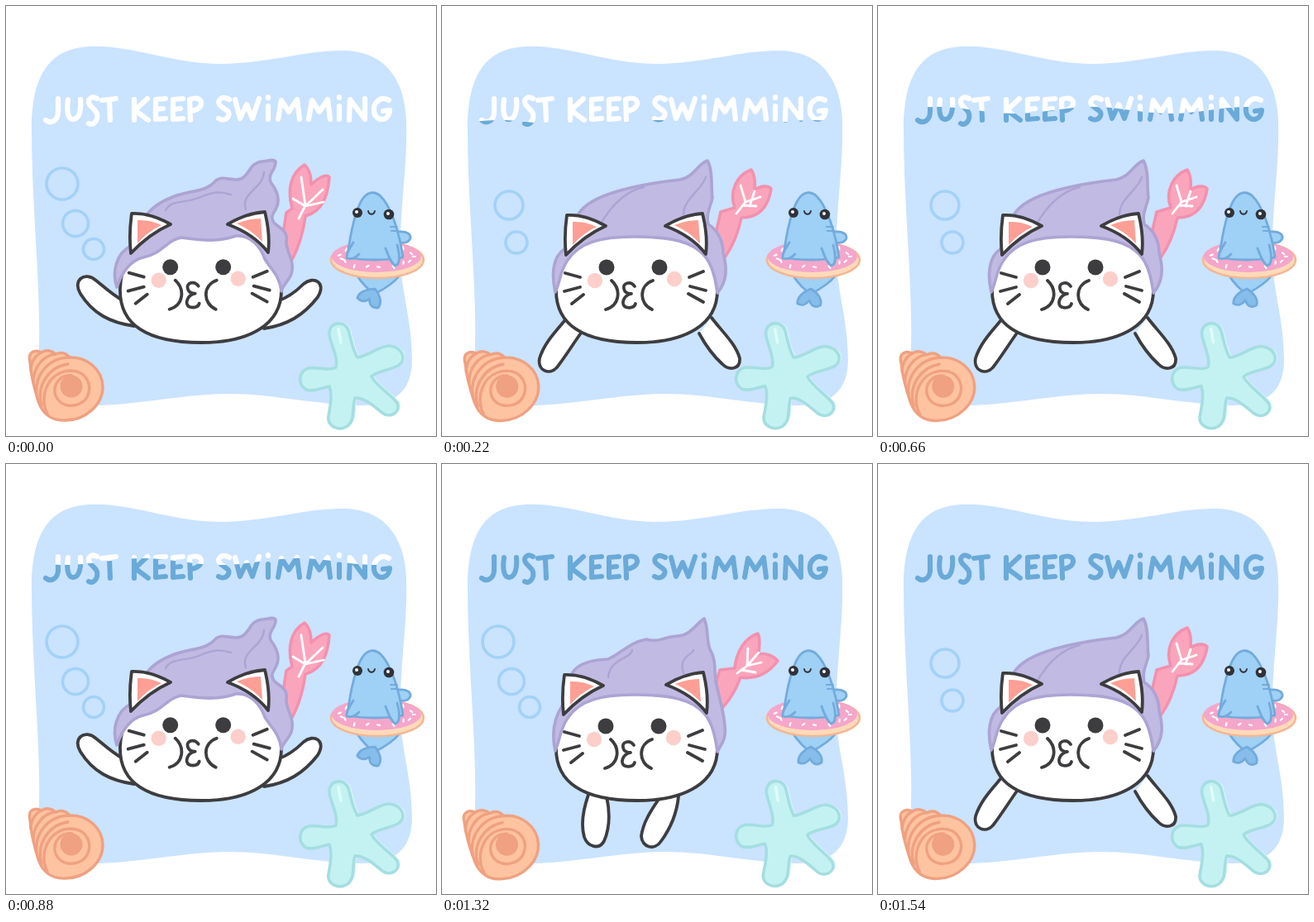
Write an HTML page that moves like this. It is 520 px wide and 520 px high and loops after 1760 ms.

```html
<!DOCTYPE html>
<html lang="en">
<head>
<meta charset="utf-8">
<title>Just keep swimming</title>
<style>
html, body { margin: 0; width: 100%; height: 100%; overflow: hidden; background: #fff; }
svg { display: block; width: 100%; height: 100%; }
path, circle, ellipse { stroke-linecap: round; stroke-linejoin: round; }
.line { fill: none; }
.ink { stroke: #3d3d40; stroke-width: 3.8; }
.white { fill: #fff; }
.bubble { fill: none; stroke: #a4d1f7; stroke-width: 3.6; }
.tail { fill: #fba5bd; stroke: #f391ae; stroke-width: 3.6; }
.vein { fill: none; stroke: #fff; stroke-width: 2.8; }
.hair { fill: #c1bae3; stroke: #aca4d3; stroke-width: 3.6; }
.strand { fill: none; stroke: #aca4d3; stroke-width: 2.4; }
.shark { fill: #9fd0f5; stroke: #72abdc; stroke-width: 2.8; }
.fin { fill: #86bdea; }
.shell { fill: none; stroke: #efa181; stroke-width: 3.4; }
.letters { fill: none; stroke-width: 6.2; }
</style>
</head>
<body>
<svg viewBox="0 0 520 520">
  <defs>
    <path id="words" d="M63 112L63 128C63 139 54 143 48 138
      M75 113C73 128 75 138 82 137C89 136 91 124 90 113
      M110 112C103 108 98 113 101 119C105 125 112 127 110 136C108 143 103 144 100 142
      M116 114L133 112M125 114L126 138
      M155 113L155 138M171 112L156 126L172 138
      M193 112L181 113L181 137L193 136M181 125L190 124
      M214 112L202 113L202 137L214 136M202 125L211 124
      M223 138L222 113C240 106 241 126 223 127
      M270 113C262 108 255 113 258 119C262 125 272 126 269 133C266 139 260 138 257 136
      M277 113L283 136L291 119L298 136L306 112
      M317 121L317 137M317 110L317 111
      M329 137L333 114L342 128L352 113L355 137
      M366 137L370 114L379 128L389 113L392 137
      M403 121L403 137M403 110L403 111
      M415 138L416 113L434 137L434 112
      M463 114C453 108 444 117 445 127C446 140 463 141 464 126L456 127"/>
    <clipPath id="water"><path id="wave"/></clipPath>
    <path id="star" d="M391 398C389 382 409 379 414 392C417 402 419 416 425 425C440 423 452 410 464 411C480 413 485 428 474 435C462 441 447 442 442 448C448 460 466 470 473 480C478 492 464 499 455 492C443 482 432 473 422 474C418 486 423 500 413 508C402 515 388 508 390 496C392 484 395 470 391 460C380 462 372 467 363 464C352 457 354 441 366 438C378 436 390 442 399 437C402 425 393 410 391 398Z"/>
  </defs>

  <path fill="#cae3ff" d="M100 49C150 46 200 70 260 70C320 69 360 54 405 54C455 53 482 85 484 138C486 195 475 250 477 310C479 350 491 380 491 430C490 472 462 483 430 483C370 482 320 468 265 469C210 470 150 484 100 483C60 480 38 470 40 410C42 340 31 240 31 150C31 90 48 52 100 49Z"/>

  <g role="img" aria-label="Just keep swimming">
    <use href="#words" class="letters" stroke="#fff"/>
    <g clip-path="url(#water)"><use href="#words" class="letters" stroke="#6aaad9"/></g>
  </g>

  <g id="bubbles"></g>
  <g id="cat"></g>

  <g>
    <path class="shark" d="M423 324C429 333 437 343 446 348C458 342 468 336 476 326Z"/>
    <path id="fluke" class="shark fin" d="M446 342C438 346 430 352 431 361C437 364 442 361 445 356C448 363 453 365 459 361C461 353 454 346 446 342Z"/>
    <ellipse cx="449" cy="307" rx="56" ry="22" fill="#fddab9" stroke="#f4b694" stroke-width="2.5"/>
    <ellipse cx="448" cy="303" rx="54" ry="19" fill="#f5a6cb"/>
    <path id="sprinkles" class="vein" style="stroke-width:2.2"/>
    <path class="shark" d="M476 273C484 272 490 276 489 281C487 286 481 287 477 286"/>
    <path class="shark" d="M413 304C416 275 424 238 435 229C441 224 448 225 453 230C466 243 476 275 480 304C460 308 432 308 413 304Z"/>
    <path class="shark" d="M420 286C416 293 411 299 412 305C418 307 424 303 427 300"/>
    <path class="shark" d="M459 293C462 301 465 311 471 314C477 312 476 300 473 289"/>
    <path class="shark line" style="stroke-width:2" d="M465 267L473 267M466 272L474 272"/>
    <g fill="#303238"><circle cx="425" cy="250" r="6"/><circle cx="463" cy="252" r="6.3"/></g>
    <circle cx="424" cy="249" r="2" fill="#fff"/><circle cx="462" cy="251" r="2" fill="#fff"/>
    <path class="line" stroke="#303238" stroke-width="1.8" d="M438 248C439 253 445 253 446 248"/>
  </g>

  <g id="starfish">
    <use href="#star" fill="#d3f7f5" transform="translate(3 -1)"/>
    <use href="#star" fill="#c4f2f2"/>
    <use href="#star" fill="none" stroke="#a5dee0" stroke-width="3.6"/>
    <path class="line" stroke="#e0fbfa" stroke-width="3.5" d="M402 391L405 407"/>
  </g>

  <g id="shell">
    <path class="shell" style="fill:#fec3a0" d="M29 430C26 418 35 415 43 419C48 415 56 417 60 421C67 418 73 420 77 425C98 424 117 440 117 461C117 482 96 501 72 501C55 502 44 493 39 478C34 462 30 447 29 430Z"/>
    <path class="shell" d="M30 441C30 430 36 422 43 419M33 455C33 436 46 422 60 421M37 470C34 446 52 425 77 425M43 483C36 458 53 436 75 433"/>
    <path class="shell" d="M50 493C39 472 51 441 79 441C98 442 105 459 98 473C90 487 66 487 60 471C55 456 68 445 80 447"/>
    <circle cx="79" cy="460" r="13.5" fill="#efa181"/>
  </g>
</svg>
<script>
const $ = id => document.getElementById(id);
const path = (cls, d) => `<path class="${cls}" d="${d}"/>`;
const bubble = ([x, y, r]) => `<circle class="bubble" cx="${x}" cy="${y}" r="${r}"/>`;

const threeBubbles = [[68, 215, 19], [84, 263, 15.5], [106, 294, 12.5]];
const twoBubbles = [[81, 241, 17], [90, 286, 13]];
const hairline = "C330 325 325 306 311 296C295 282 265 279 232 279C190 279 166 287 153 306C142 320 143 335 137 346Z";

const up = {
  bubbles: threeBubbles, face: [.7, .7], ears: [1, -2, -2, -2], shell: 0, star: 0, fluke: 25,
  arms: "M155 387C126 383 105 372 90 348C80 332 95 320 109 332C120 341 130 350 141 356M312 390C340 386 360 374 377 352C388 334 372 326 360 336C350 346 340 353 328 357",
  hair: "M134 340C128 322 133 299 151 290L165 268C166 252 180 240 199 232C220 222 240 227 254 211C262 204 274 213 284 209C296 204 293 190 310 188C318 187 323 185 326 188C327 198 316 202 320 213C327 222 333 234 326 246C322 253 320 255 324 262C332 270 341 271 339 285C338 296 350 308 345 324C342 333 335 336 333 345C331 326 320 318 313 306C308 292 296 276 278 278C256 286 235 283 212 280C194 283 190 299 166 304C149 308 140 323 134 340Z",
  strands: "M193 247C200 234 215 239 233 232C253 223 262 225 272 228M290 246C283 226 311 221 312 201",
  tail: "M339 250L346 245C340 222 344 202 361 192C369 200 369 210 369 216C376 209 387 202 391 207C389 230 383 248 362 254C359 276 353 296 342 313L333 290Z",
  veins: "M354 257L362 241L357 207M347 233L362 242L383 222M362 242L384 237"
};
const mid = {
  bubbles: twoBubbles, face: [1, 1], ears: [0, 0, 0, 0], shell: -1, star: .8, fluke: 4,
  arms: "M152 376C140 391 124 406 118 426C115 441 130 447 139 437C149 424 159 408 169 394M326 377C338 393 355 408 360 426C361 440 347 441 339 433C328 423 318 409 311 396",
  hair: "M137 346C132 325 134 303 148 294L160 264C163 246 179 235 203 227C231 217 261 213 288 210C306 206 309 191 321 187C328 199 325 220 327 232C325 242 319 251 322 264C334 271 340 285 340 299C345 317 345 333 333 347" + hairline,
  strands: "M194 260C205 242 222 224 244 219M292 252C292 233 314 223 319 207",
  tail: "M337 249L354 244C347 224 356 205 374 198C380 207 378 216 378 222C386 217 395 217 398 221C395 240 386 256 362 256C358 275 352 290 342 304L330 280Z",
  veins: "M356 251L367 237L361 217M372 242L378 224M367 237L385 231M364 241L380 242"
};
const down = {
  bubbles: threeBubbles, face: [0, 2], ears: [-3, 2, 1, 1], shell: -2, star: 1.6, fluke: 0,
  arms: "M177 400C170 420 168 437 172 451C176 463 190 467 196 456C203 440 203 420 199 402M263 404C252 420 243 434 241 450C242 464 257 468 265 456C276 441 284 422 286 402",
  hair: "M137 347C132 325 136 307 145 293L154 266C155 243 176 237 201 236C217 229 226 216 247 212C262 217 273 207 286 208C302 206 306 194 317 187C323 200 319 211 324 224C333 239 328 254 332 267C336 286 341 300 342 317C344 333 338 338 333 348" + hairline,
  strands: "M201 258C203 235 230 235 230 225M292 253C285 233 304 230 304 225",
  tail: "M336 249L354 247C356 226 367 210 382 205C386 213 383 222 383 230C391 228 401 232 406 238C396 252 380 261 361 258C356 272 349 285 337 297L328 275Z",
  veins: "M357 253L369 244L370 223M369 244L383 228M369 244L386 240M362 249L379 252"
};
const poses = [up, mid, down, mid];
const levels = [160, 142, 134, 126, 118, 110, 95, 95];

const ear = (outer, inner, x, y) => `<g transform="translate(${x} ${y})">` +
  path("ink white", outer) + `<path fill="#fd9f94" d="${inner}"/></g>`;

const face = `
  <g fill="#3d3d40"><circle cx="198" cy="315" r="9.5"/><circle cx="262" cy="315" r="9.5"/></g>
  <g fill="#fccfca"><circle cx="184" cy="331" r="9.2"/><circle cx="280" cy="329" r="9.2"/></g>` +
  path("ink line", "M204 331C216 342 214 361 197 366M254 331C237 337 237 359 253 366") +
  path("ink line", "M232 338C227 331 217 334 219 341C220 346 224 347 228 347C218 349 215 360 221 363C227 365 232 363 233 359") +
  path("ink line", "M148 322L166 327M147 344L166 339M156 359L170 348M298 327L315 320M299 338L318 343M297 347L315 357");

function drawCat(p) {
  const [lx, ly, rx, ry] = p.ears;
  return path("tail", p.tail) + path("vein", p.veins) + path("ink white", p.arms) +
    path("ink white", "M138 342C140 290 180 262 235 262C295 262 331 295 333 342C334 385 295 407 236 407C170 407 137 385 138 342Z") +
    path("hair", p.hair) + path("strand", p.strands) +
    ear("M150 301C148 284 149 267 151 253C168 252 184 258 198 266C180 274 164 286 150 301Z",
      "M158 289L158 261Q173 260 187 267Q170 275 158 289Z", lx, ly) +
    ear("M270 266C285 257 300 252 315 251C319 267 321 284 319 300C306 283 289 273 270 266Z",
      "M281 265Q295 259 310 259L312 287Q299 273 281 265Z", rx, ry) +
    `<g transform="translate(${p.face})">${face}</g>`;
}

function wavePath(level, phase) {
  let d = "M30 160";
  for (let x = 30; x <= 480; x += 6) d += `L${x} ${level - 4 * Math.cos((x - 165) / 30 + phase)}`;
  return d + "L480 160Z";
}

// Sprinkles follow the visible ring of icing.
let bits = "";
for (let i = 0; i < 17; i++) {
  const a = i * 2 * Math.PI / 17, tilt = i * 2.4;
  bits += `M${448 + 44 * Math.cos(a)} ${303 + 13 * Math.sin(a)}l${3 * Math.cos(tilt)} ${3 * Math.sin(tilt)}`;
}
$("sprinkles").setAttribute("d", bits);

const turn = (id, angle, x, y) => $(id).setAttribute("transform", `rotate(${angle} ${x} ${y})`);

let shown = -1;
function tick(now) {
  const step = Math.floor(now / 220) % 8;
  if (step !== shown) {
    shown = step;
    const p = poses[step % 4];
    $("bubbles").innerHTML = p.bubbles.map(bubble).join("");
    $("cat").innerHTML = drawCat(p);
    $("wave").setAttribute("d", wavePath(levels[step], step % 2 * Math.PI));
    turn("shell", p.shell * 1.5, 85, 470);
    turn("starfish", p.star, 418, 447);
    turn("fluke", p.fluke, 446, 343);
  }
  requestAnimationFrame(tick);
}
tick(0);
</script>
</body>
</html>
```
